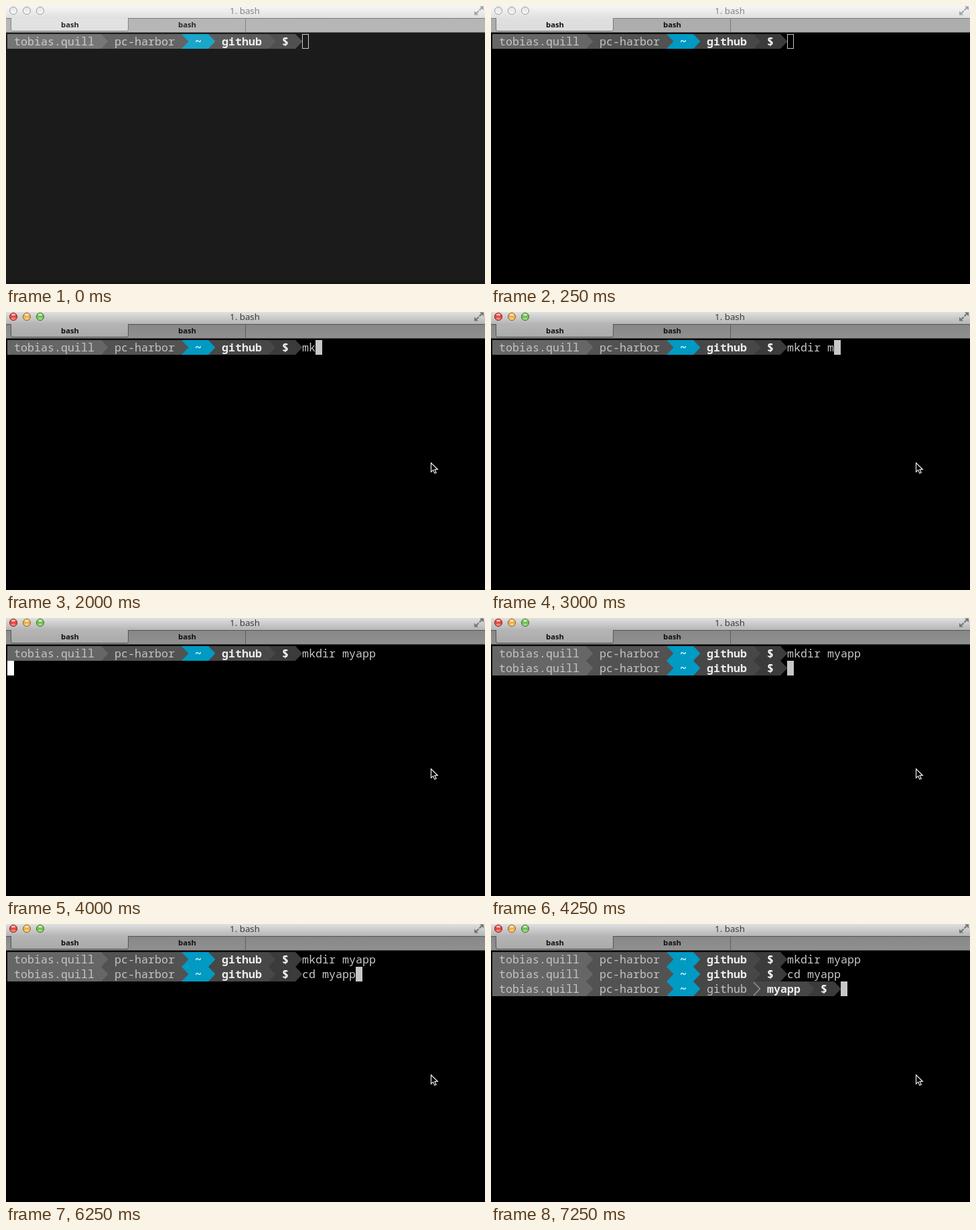
Recreate the animation shown at these times as an HTML page with a canvas. Size 715 px wide and 416 px high, loop 8 s.

```html
<!DOCTYPE html>
<html lang="en">
<head>
<meta charset="utf-8">
<title>Terminal</title>
<style>
  html, body { margin: 0; width: 100%; height: 100%; overflow: hidden; background: #000; }
  canvas { display: block; }
</style>
</head>
<body>
<canvas id="stage" width="715" height="416"></canvas>
<script>
const ctx = document.getElementById('stage').getContext('2d');
const W = 715, H = 416, LOOP = 8000;
const LEFT = 2, TOP = 42, CELL_W = 10, CELL_H = 22;
const MONO = '16.667px "Noto Sans Mono", "DejaVu Sans Mono", monospace';
const SANS = '"Noto Sans", "Open Sans", sans-serif';
const GREY = '#c7c7c7';

// Prompt parts: text, background, text colour, weight
const USER = ['tobias.quill', '#666666', '#c4c4c4', 500];
const HOST = ['pc-harbor', '#525252', '#c4c4c4', 500];
const HOME = ['~', '#009ac3', '#ffffff', 700];
const PATH = '#474747';
const SIGN = ['$', '#3b3b3b', '#ffffff', 700];
const repoPrompt = [USER, HOST, HOME, ['github', PATH, '#ececec', 600], SIGN];
const appPrompt = [USER, HOST, HOME, ['github', PATH, '#c4c4c4', 500],
  ['myapp', PATH, '#ececec', 600], SIGN];

// Each line: when its cursor arrives, when its prompt shows, and
// [time, number of letters typed] steps
const lines = [
  { start: 0, ready: 0, prompt: repoPrompt, text: 'mkdir myapp',
    keys: [[2000, 2], [2250, 4], [2500, 6], [3000, 7], [3250, 8], [3500, 10], [3750, 11]] },
  { start: 4000, ready: 4250, prompt: repoPrompt, text: 'cd myapp',
    keys: [[4750, 1], [5000, 3], [5250, 4], [5500, 5], [6000, 6], [6250, 8]] },
  { start: 7000, ready: 7250, prompt: appPrompt, text: '', keys: [] }
];

function rect(x, y, w, h, color) {
  ctx.fillStyle = color;
  ctx.fillRect(x, y, w, h);
}

function shade(y, h, from, to) {
  const g = ctx.createLinearGradient(0, y, 0, y + h);
  g.addColorStop(0, from);
  g.addColorStop(1, to);
  return g;
}

function trace(points, close) {
  ctx.beginPath();
  points.forEach(([x, y]) => ctx.lineTo(x, y));
  if (close) ctx.closePath();
}

function label(text, x, y, font, color, align = 'left') {
  ctx.font = font;
  ctx.fillStyle = color;
  ctx.textAlign = align;
  ctx.fillText(text, x, y);
}

function mono(text, x, y, color, weight = 500) {
  label(text, x, y + 17, weight + ' ' + MONO, color);
}

function light(x, color, edge, active) {
  ctx.beginPath();
  ctx.arc(x, 7, 5.6, 0, Math.PI * 2);
  ctx.fillStyle = active ? color : shade(1, 12, '#e2e2e2', '#f8f8f8');
  ctx.fill();
  ctx.strokeStyle = active ? edge : '#a0a0a0';
  ctx.lineWidth = 1;
  ctx.stroke();
  if (!active) return;
  ctx.beginPath();
  ctx.ellipse(x, 3.9, 3, 1.7, 0, 0, Math.PI * 2);
  ctx.fillStyle = 'rgba(255,255,255,.65)';
  ctx.fill();
  ctx.beginPath();
  ctx.ellipse(x, 10, 3.4, 1.8, 0, 0, Math.PI * 2);
  ctx.fillStyle = 'rgba(255,255,255,.35)';
  ctx.fill();
}

function zoomIcon(color) {
  ctx.fillStyle = ctx.strokeStyle = color;
  ctx.lineWidth = 2;
  trace([[707, 0.5], [713, 0.5], [713, 6.5]], true);
  ctx.fill();
  trace([[699, 7.5], [699, 13.5], [705, 13.5]], true);
  ctx.fill();
  trace([[706.5, 6.5], [711, 2]]);
  ctx.stroke();
  trace([[701, 12], [705.5, 7.5]]);
  ctx.stroke();
}

function drawChrome(active) {
  rect(0, 0, W, 18, active ? shade(0, 18, '#e0e0e0', '#b5b5b5') : shade(0, 18, '#f6f6f6', '#e0e0e0'));
  rect(0, 19, W, 20, active ? shade(19, 20, '#888888', '#909090') : '#adadad');
  rect(0, 18, W, 1, active ? '#555555' : '#7c7c7c');
  rect(0, 39, W, 1, active ? '#474747' : '#5d5d5d');

  ctx.beginPath();
  ctx.moveTo(7.5, 18);
  ctx.lineTo(7.5, 35);
  ctx.quadraticCurveTo(7.5, 37.5, 10, 37.5);
  ctx.lineTo(180, 37.5);
  ctx.quadraticCurveTo(182.5, 37.5, 182.5, 35);
  ctx.lineTo(182.5, 18);
  ctx.fillStyle = active ? shade(18, 20, '#b5b5b5', '#a9a9a9') : shade(18, 20, '#e0e0e0', '#dcdcdc');
  ctx.fill();
  ctx.strokeStyle = active ? '#555555' : '#777777';
  ctx.lineWidth = 1;
  ctx.stroke();
  rect(357, 19, 1, 20, active ? '#5c5c5c' : '#777777');

  light(11, '#e5473f', '#8f2a26', active);
  light(31, '#ecb04a', '#94692a', active);
  light(51, '#72c050', '#40772f', active);
  zoomIcon(active ? '#747474' : '#a2a2a2');

  label('1. bash', 356.5, 12, '13.3px ' + SANS, active ? '#3c3c3c' : '#858585', 'center');
  for (const x of [95.5, 270.5]) label('bash', x, 32, '600 11.3px ' + SANS, '#111111', 'center');
}

function drawPrompt(parts, y) {
  let x = LEFT;
  const mid = y + CELL_H / 2, bottom = y + CELL_H;
  parts.forEach(([text, bg, fg, weight], i) => {
    const next = parts[i + 1];
    const end = x + (text.length + 2) * CELL_W;
    rect(x, y, end - x, CELL_H, bg);
    if (next) rect(end, y, CELL_W, CELL_H, next[1]);
    if (next && next[1] === bg) {
      trace([[end, y + 1], [end + 9.5, mid], [end, bottom - 1]]);
      ctx.strokeStyle = '#959595';
      ctx.lineWidth = 1.5;
      ctx.stroke();
    } else {
      trace([[end, y], [end + 10.5, mid], [end, bottom]], true);
      ctx.fillStyle = bg;
      ctx.fill();
    }
    mono(text, x + CELL_W, y, fg, weight);
    x = end + CELL_W;
  });
  return x;
}

function drawCursor(x, y, active, color) {
  if (active) {
    rect(x, y, CELL_W, CELL_H, color);
  } else {
    ctx.strokeStyle = GREY;
    ctx.lineWidth = 1;
    ctx.strokeRect(x + 0.5, y + 0.5, CELL_W - 1, CELL_H - 1);
  }
}

function drawLines(t, active) {
  lines.forEach((line, row) => {
    if (t < line.start) return;
    const y = TOP + row * CELL_H;
    const ready = t >= line.ready;
    let x = LEFT;
    if (ready) {
      x = drawPrompt(line.prompt, y);
      const typed = line.keys.reduce((n, [at, count]) => t >= at ? count : n, 0);
      mono(line.text.slice(0, typed), x, y, GREY);
      x += typed * CELL_W;
    }
    const next = lines[row + 1];
    if (!next || t < next.start) drawCursor(x, y, active, ready ? GREY : '#ffffff');
  });
}

function drawPointer(x, y) {
  ctx.save();
  ctx.translate(x, y);
  trace([[0.5, 0.8], [0.5, 14.3], [3.6, 11.4], [5.8, 16.4], [8.2, 15.4], [6, 10.5], [10.3, 10.5]], true);
  ctx.fillStyle = '#000';
  ctx.fill();
  ctx.strokeStyle = '#fff';
  ctx.lineWidth = 1.1;
  ctx.stroke();
  ctx.restore();
}

function draw(t) {
  const active = t >= 1000;
  rect(0, 0, W, H, '#000');
  drawChrome(active);
  drawLines(t, active);
  if (t < 250) {
    rect(0, 19, W, H - 19, 'rgba(255,255,255,.106)');
    rect(0, 411, W, 5, 'rgba(0,0,0,.2)');
  }
  if (t >= 750) drawPointer(634, 225);
  else if (t >= 500) drawPointer(651, 200);
}

function tick() {
  draw(performance.now() % LOOP);
  requestAnimationFrame(tick);
}
tick();
</script>
</body>
</html>
```
